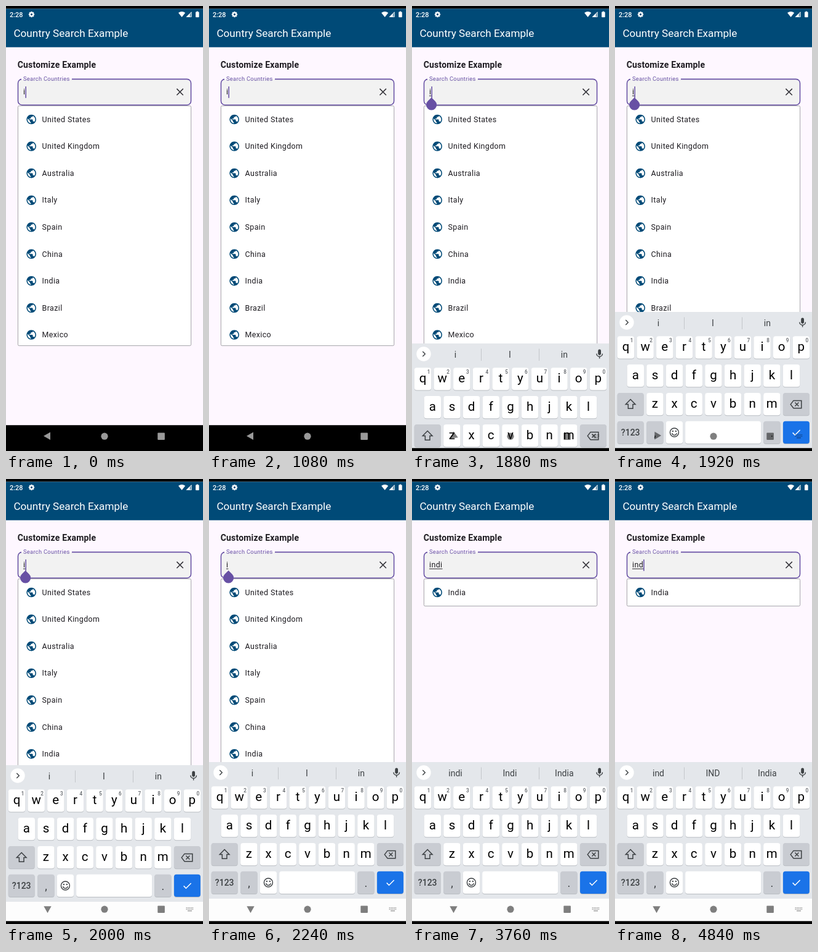
Animation, 320 px wide and 720 px high, one loop 5 s. Source, as an HTML page with a canvas:

```html
<!DOCTYPE html>
<html lang="en">
<head>
<meta charset="utf-8">
<title>Country Search Example</title>
<style>
  html, body { margin: 0; width: 100%; height: 100%; overflow: hidden; background: #000; }
  canvas { display: block; width: 320px; height: 720px; }
</style>
</head>
<body>
<canvas id="stage"></canvas>
<script>
const LOOP = 5000, STEP = 40;
const BLUE = '#004a77', PURPLE = '#6750a4', INK = '#1d1b20', KEY_INK = '#3c4043';
const COUNTRIES = ['United States', 'United Kingdom', 'Australia', 'Italy', 'Spain',
  'China', 'India', 'Brazil', 'Mexico'];
const GLOBE = new Path2D('M12 2C6.48 2 2 6.48 2 12s4.48 10 10 10 10-4.48 10-10S17.52 2 12 2z' +
  'm-1 17.93c-3.95-.49-7-3.85-7-7.93 0-.62.08-1.21.21-1.79L9 15v1c0 1.1.9 2 2 2v1.93z' +
  'm6.9-2.54c-.26-.81-1-1.39-1.9-1.39h-1v-3c0-.55-.45-1-1-1H8v-2h2c.55 0 1-.45 1-1V7h2' +
  'c1.1 0 2-.9 2-2v-.41c2.93 1.19 5 4.06 5 7.41 0 2.08-.8 3.97-2.1 5.39z');

const canvas = document.getElementById('stage');
const ctx = canvas.getContext('2d');
const dpr = window.devicePixelRatio || 1;
canvas.width = 320 * dpr;
canvas.height = 720 * dpr;

function rect(x, y, w, h, color) {
  ctx.fillStyle = color;
  ctx.fillRect(x, y, w, h);
}

function round(x, y, w, h, r, color) {
  ctx.beginPath();
  ctx.roundRect(x, y, w, h, r);
  ctx.fillStyle = color;
  ctx.fill();
}

function disc(x, y, r, color) {
  ctx.beginPath();
  ctx.arc(x, y, r, 0, Math.PI * 2);
  ctx.fillStyle = color;
  ctx.fill();
}

function poly(points, color, closed = true) {
  ctx.beginPath();
  points.forEach(([x, y]) => ctx.lineTo(x, y));
  if (closed) ctx.closePath();
  if (color) {
    ctx.fillStyle = color;
    ctx.fill();
  }
}

function stroke(color, width) {
  ctx.strokeStyle = color;
  ctx.lineWidth = width;
  ctx.stroke();
}

function text(str, x, y, size, color, { weight = 400, spacing = 0, align = 'left' } = {}) {
  ctx.font = `${weight} ${size}px Roboto, sans-serif`;
  ctx.letterSpacing = spacing + 'px';
  ctx.textAlign = align;
  ctx.fillStyle = color;
  ctx.fillText(str, x, y);
  return ctx.measureText(str).width;
}

// Linear interpolation through [time, value] stops
function track(t, stops) {
  if (t <= stops[0][0]) return stops[0][1];
  for (let i = 1; i < stops.length; i++) {
    const [t0, v0] = stops[i - 1], [t1, v1] = stops[i];
    if (t <= t1) return v0 + (v1 - v0) * (t - t0) / (t1 - t0);
  }
  return stops[stops.length - 1][1];
}

// Latest [time, value] entry already reached
function latest(t, list) {
  return list.filter(([at]) => at <= t).pop()[1];
}

const typed = t => latest(t, [[0, 'i'], [2840, 'in'], [3040, 'ind'], [3240, 'indi'], [4800, 'ind']]);
const hints = t => latest(t, [
  [0, ['i', 'I', 'in']],
  [2880, ['in', "I'm", 'un']],
  [3080, ['ind', 'IND', 'India']],
  [3280, ['indi', 'Indi', 'India']],
  [4840, ['ind', 'IND', 'India']]
]);
const cursorOn = t => latest(t, [[0, true], [600, false], [1080, true], [1600, false], [1720, true],
  [2240, false], [2760, true], [3760, false], [4280, true]]);
const keyboardTop = t => track(t, [[1760, 716], [1800, 706], [1840, 630], [1880, 546], [1920, 495],
  [1960, 474], [2000, 463], [2040, 459.5], [2080, 458.5], [2120, 458]]);

function gear(x, y) {
  for (let i = 0; i < 8; i++) {
    ctx.save();
    ctx.translate(x, y);
    ctx.rotate(i * Math.PI / 4);
    rect(-1.1, -4.7, 2.2, 2.4, '#fff');
    ctx.restore();
  }
  ctx.beginPath();
  ctx.arc(x, y, 2.6, 0, Math.PI * 2);
  stroke('#fff', 2);
}

function header() {
  rect(0, 4.5, 320, 711, '#fef7ff');
  rect(0, 4.5, 320, 62.2, BLUE);
  text('2:28', 6, 17.6, 10.9, '#fff', { weight: 500 });
  gear(41.5, 13.6);
  ctx.beginPath();
  ctx.moveTo(285.6, 18);
  ctx.lineTo(280, 11);
  ctx.quadraticCurveTo(285.6, 6.8, 291.2, 11);
  ctx.fillStyle = '#fff';
  ctx.fill();
  poly([[292.5, 18], [301.5, 18], [301.5, 9]], 'rgba(255,255,255,.4)');
  poly([[292.5, 18], [298.6, 18], [298.6, 11.9]], '#fff');
  poly([[293.4, 17.6], [301.1, 17.6], [301.1, 9.9]]);
  stroke('#fff', .8);
  round(308, 9.6, 5.6, 8.6, .8, '#fff');
  rect(309.6, 8.6, 2.4, 1.2, '#fff');
  text('Country Search Example', 12.44, 50.4, 17.11, '#fff');
  text('Customize Example', 18.7, 99.9, 14, INK, { weight: 700, spacing: .19 });
}

function field(t) {
  round(19.4, 118.4, 281.2, 41.8, 6.5, '#f2f2f2');
  ctx.save();
  ctx.beginPath();
  ctx.rect(0, 110, 320, 60);
  ctx.rect(25, 114, 82, 8);
  ctx.clip('evenodd');
  ctx.beginPath();
  ctx.roundRect(19.5, 118.4, 281, 41.8, 6.5);
  stroke(PURPLE, 1.56);
  ctx.restore();
  text('Search Countries', 28, 121.4, 9.33, PURPLE, { spacing: .29 });

  const w = text(typed(t), 28, 143.3, 12.44, INK, { spacing: .39 });
  if (t >= 1760) rect(28, 144.9, w, .9, INK);
  if (cursorOn(t)) rect(28 + w, 130.2, 1.56, 18.6, PURPLE);

  ctx.beginPath();
  ctx.moveTo(277.4, 133.9);
  ctx.lineTo(287.8, 144.3);
  ctx.moveTo(287.8, 133.9);
  ctx.lineTo(277.4, 144.3);
  stroke('#333238', 1.5);
  return 28.5 + w;
}

function list(t) {
  const names = t >= 3600 ? ['India'] : COUNTRIES;
  const h = names.length > 1 ? 388 : 44;
  ctx.beginPath();
  ctx.roundRect(19.4, 161.6, 281.2, h, 2);
  ctx.fillStyle = '#fff';
  ctx.fill();
  stroke('#8e8e93', .8);
  names.forEach((name, i) => {
    const y = 183.5 + i * 43.56;
    ctx.save();
    ctx.translate(41.2 - 9.33, y - 9.33);
    ctx.scale(.7778, .7778);
    ctx.fillStyle = BLUE;
    ctx.fill(GLOBE);
    ctx.restore();
    text(name, 58.5, y + 4.3, 12.44, INK, { spacing: .39 });
  });
}

function handle(t, x) {
  const alpha = track(t, [[1720, 0], [1800, .5], [1880, 1], [2840, 1], [2920, .25], [2960, 0]]);
  if (!alpha) return;
  ctx.save();
  ctx.globalAlpha = alpha;
  ctx.translate(x - .3, 160);
  ctx.rotate(Math.PI / 4);
  round(-8.55, -8.55, 17.1, 17.1, [0, 8.55, 8.55, 8.55], PURPLE);
  ctx.restore();
}

function touch(t) {
  const alpha = track(t, [[1600, 0], [1640, .9], [1720, .9], [1800, .6], [1880, 0]]);
  if (!alpha) return;
  ctx.save();
  ctx.globalAlpha = alpha;
  disc(62.3, 142, 9, '#f8f8f8');
  stroke('#cfcfcf', 1);
  ctx.restore();
}

function key(x, y, w, color = '#fff') {
  round(x - w / 2, y - 17.6, w, 36.6, 4, '#b9bdc2');
  round(x - w / 2, y - 18.2, w, 36.2, 4, color);
}

function letters(str, x, y) {
  [...str].forEach((c, i) => {
    const cx = x + i * 31.65;
    key(cx, y, 27.4);
    text(c, cx, y + 5.8, 20.5, '#000', { align: 'center' });
  });
}

function suggestions(words) {
  disc(19, 17, 11.7, '#fff');
  poly([[17.3, 13], [21.3, 17], [17.3, 21]], null, false);
  stroke(KEY_INK, 1.4);
  words.forEach((word, i) =>
    text(word, 70.5 + i * 88.4, 23, 14, KEY_INK, { align: 'center' }));
  rect(112, 8.5, 1, 19.5, '#c3c6ca');
  rect(206, 8.5, 1, 19.5, '#c3c6ca');
  round(302.2, 9.6, 4.8, 9.4, 2.4, KEY_INK);
  ctx.beginPath();
  ctx.arc(304.6, 16.4, 4.8, 0, Math.PI);
  ctx.moveTo(304.6, 21);
  ctx.lineTo(304.6, 24.4);
  stroke(KEY_INK, 1.4);
}

function keyIcons() {
  poly([[25.2, 141.5], [33, 149.4], [29, 149.4], [29, 156.3], [21.4, 156.3], [21.4, 149.4], [17.4, 149.4]]);
  stroke(KEY_INK, 1.5);

  poly([[285.2, 149.6], [290, 143.4], [302.8, 143.4], [302.8, 155.8], [290, 155.8]]);
  stroke(KEY_INK, 1.5);
  ctx.beginPath();
  ctx.moveTo(292.4, 146.6);
  ctx.lineTo(298.4, 152.6);
  ctx.moveTo(298.4, 146.6);
  ctx.lineTo(292.4, 152.6);
  stroke(KEY_INK, 1.4);

  ctx.beginPath();
  ctx.arc(96.4, 195, 7, 0, Math.PI * 2);
  stroke(KEY_INK, 1.4);
  disc(93.9, 193, 1.15, KEY_INK);
  disc(98.9, 193, 1.15, KEY_INK);
  ctx.beginPath();
  ctx.arc(96.4, 195.6, 3.8, .15, Math.PI - .15);
  stroke(KEY_INK, 1.4);

  poly([[288.6, 195.4], [292.4, 199.2], [300.6, 191]], null, false);
  stroke('#fff', 1.5);
}

function keyboard(t) {
  const top = keyboardTop(t);
  if (top > 715) return;
  const gray = '#c9ccd2';
  ctx.save();
  ctx.translate(0, top);
  rect(0, 0, 320, 221, '#e4e7eb');
  rect(0, 221, 320, 50, '#fdfdfd');
  suggestions(hints(t));
  letters('qwertyuiop', 17.5, 57.5);
  [...'1234567890'].forEach((d, i) =>
    text(d, 27 + i * 31.65, 49, 8.2, '#5f6368', { weight: 500, align: 'center' }));
  letters('asdfghjkl', 33.3, 103.3);
  letters('zxcvbnm', 64.9, 149.2);
  key(25.2, 149.2, 43, gray);
  key(294.4, 149.2, 43, gray);
  key(25.2, 195, 43, gray);
  key(64.9, 195, 27.4, gray);
  key(96.4, 195, 27.4);
  key(175.6, 195, 123);
  key(254.9, 195, 27.4, gray);
  key(294.4, 195, 43, '#1a73e8');
  text('?123', 25.2, 200, 14, KEY_INK, { weight: 500, align: 'center' });
  text(',', 64.9, 201.6, 18, KEY_INK, { align: 'center' });
  text('.', 254.9, 201.6, 18, KEY_INK, { align: 'center' });
  keyIcons();
  ctx.restore();
}

function navIcons(t) {
  const color = t < 1840 ? 'rgba(255,255,255,.6)' : 'rgba(0,0,0,.5)';
  const turn = track(t, [[1800, 0], [1840, 12], [1920, 60], [1960, 80], [2000, 90]]);
  ctx.save();
  ctx.translate(67.5, 695.8);
  ctx.rotate(-turn * Math.PI / 180);
  poly([[-6.5, 0], [4.5, -6.2], [4.5, 6.2]], color);
  ctx.restore();
  disc(160, 696.2, 5.6, color);
  round(246.3, 690.4, 11.6, 11.6, 1, color);

  if (t < 1760) return;
  const dot = t < 1840 ? 'rgba(255,255,255,.5)' : 'rgba(0,0,0,.38)';
  for (let row = 0; row < 2; row++)
    for (let col = 0; col < 5; col++)
      rect(292.6 + col * 2.5, 693 + row * 2.5, 1.5, 1.5, dot);
  rect(295, 698, 7, 1.4, dot);
}

function draw(t) {
  ctx.setTransform(dpr, 0, 0, dpr, 0, 0);
  rect(0, 0, 320, 720, '#000');
  header();
  list(t);
  const caret = field(t);
  handle(t, caret);
  touch(t);
  rect(0, 678.2, 320, 41.8, '#000');
  keyboard(t);
  navIcons(t);
  rect(0, 715.3, 320, 4.7, '#000');
}

const start = performance.now();
function tick() {
  const t = (performance.now() - start) % LOOP;
  draw(Math.floor(t / STEP) * STEP);
  requestAnimationFrame(tick);
}
tick();
</script>
</body>
</html>
```
